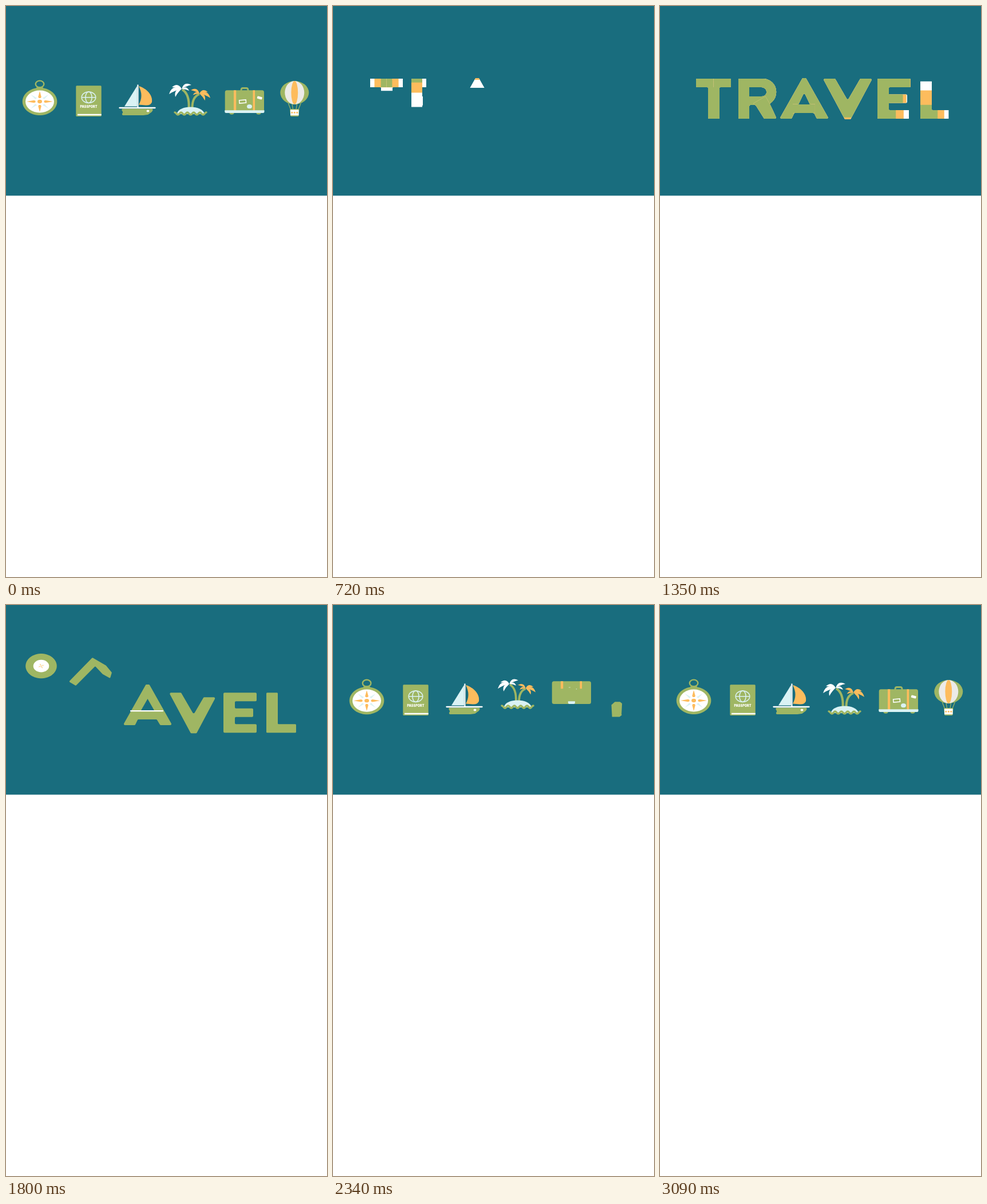
An HTML page with a canvas for the animation above (3.75 s loop, 561 by 998 pixels).

```html
<!DOCTYPE html>
<html lang="en">
<head>
<meta charset="utf-8">
<title>Travel</title>
<style>
html, body { margin: 0; width: 100%; height: 100%; overflow: hidden; background: #fff; }
canvas { display: block; width: 561px; height: 998px; }
</style>
</head>
<body>
<canvas id="stage" width="561" height="998"></canvas>
<script>
const c = document.getElementById('stage').getContext('2d');
const LOOP = 3750, STEP = 30, WRITTEN = 1560, DONE = 9999;
const TEAL = '#196d7e', GREEN = '#9fb663', ORANGE = '#fdbc5d', WHITE = '#fff',
      PALE = '#daf2f4', CREAM = '#ecebe8';

// ---- motion rules
const clamp = x => Math.max(0, Math.min(1, x));
const smooth = x => x * x * (3 - 2 * x);
const mix = (a, b, p) => a + (b - a) * p;
const ramp = (t, a, b) => smooth(clamp((t - a) / (b - a)));
const inOut = x => x < .5 ? 2 * x * x : 1 - 2 * (1 - x) * (1 - x);
const fall = t => 45 * (1 - Math.cos(Math.PI * clamp((t - 1600) / 550)));

// height of an icon: up to a peak, down a little too far, then to rest
function hop(t, start, from, peak, dur = 450) {
  const top = start + dur * .46, land = start + dur, over = 4;
  if (t < top) return mix(from, -peak, ramp(t, start, top));
  if (t < land) return mix(-peak, over, ramp(t, top, land));
  return over * (1 - ramp(t, land, land + 150));
}

// ---- polygons, clockwise from the lower left
const move = (p, dx, dy) => p.map(([x, y]) => [x + dx, y + dy]);
const box = (x, y, w, h) => [[x, y + h], [x, y], [x + w, y], [x + w, y + h]];
function turn(p, cx, cy, a, s = 1) {
  const u = Math.cos(a) * s, v = Math.sin(a) * s;
  return p.map(([x, y]) => [cx + (x - cx) * u - (y - cy) * v, cy + (x - cx) * v + (y - cy) * u]);
}
function arc(cx, cy, rx, ry, from, to, n = 12) {
  return Array.from({ length: n + 1 }, (_, i) => {
    const a = mix(from, to, i / n) * Math.PI / 180;
    return [cx + rx * Math.cos(a), cy + ry * Math.sin(a)];
  });
}
function resample(p, n = 160) {
  const next = i => p[(i + 1) % p.length];
  const len = p.map((a, i) => Math.hypot(next(i)[0] - a[0], next(i)[1] - a[1]));
  const total = len.reduce((a, b) => a + b), out = [];
  for (let k = 0, i = 0, sum = 0; k < n; k++) {
    const d = total * k / n;
    while (sum + len[i] < d) sum += len[i++];
    const f = len[i] ? (d - sum) / len[i] : 0;
    out.push(p[i].map((v, j) => mix(v, next(i)[j], f)));
  }
  return out;
}
function trace(p, r = 0) {
  const z = p[p.length - 1];
  c.moveTo((z[0] + p[0][0]) / 2, (z[1] + p[0][1]) / 2);
  p.forEach((a, i) => {
    const b = p[(i + 1) % p.length];
    c.arcTo(a[0], a[1], (a[0] + b[0]) / 2, (a[1] + b[1]) / 2, r);
  });
  c.closePath();
}
function morph(a, b, p, r = 2, hole) {
  let q = p < .5 ? a : b;
  if (p > 0 && p < 1) {
    const to = resample(b);
    q = resample(a).map((v, i) => v.map((n, j) => mix(n, to[i][j], p)));
    r = 0;
  }
  c.beginPath();
  trace(q, r);
  if (hole) trace(hole);
  c.fillStyle = GREEN;
  c.fill('evenodd');
}

// ---- drawing helpers
function oval(x, y, rx, ry, color, w) {
  c.beginPath();
  c.ellipse(x, y, rx, ry, 0, 0, 7);
  c.fillStyle = c.strokeStyle = color;
  c.lineWidth = w || 1;
  if (w) c.stroke(); else c.fill();
}
function shape(d, color) { c.fillStyle = color; c.fill(new Path2D(d)); }
function line(d, color, w, cap = 'butt') {
  c.strokeStyle = color;
  c.lineWidth = w;
  c.lineCap = cap;
  c.stroke(new Path2D(d));
}
function rect(x, y, w, h, color, r = 0) {
  c.beginPath();
  c.roundRect(x, y, w, h, r);
  c.fillStyle = color;
  c.fill();
}
function at(dx, dy, draw, px = 0, py = 0, s = 1, a = 0) {
  if (!s) return;
  c.save();
  c.translate(px + dx, py + dy);
  c.rotate(a);
  c.scale(s, s);
  c.translate(-px, -py);
  draw();
  c.restore();
}

// ---- letters, built from a common height, stem and bar
const TOP = 127, BASE = 197, STEM = 20, BAR = 15, TALL = BASE - TOP;
const letterT = (x, w) => [
  [x, TOP + BAR], [x, TOP], [x + w, TOP], [x + w, TOP + BAR],
  ...box(x + (w - STEM) / 2, TOP + BAR, STEM, TALL - BAR).reverse().filter((_, i) => i !== 1 && i !== 2).reverse()
];
const letterL = (x, w) => [[x, BASE], [x, TOP], [x + STEM, TOP], [x + STEM, BASE - BAR], [x + w, BASE - BAR], [x + w, BASE]];
function letterE(x, w, stem = STEM) {
  const p = [[x, BASE], [x, TOP]], gap = (TALL - BAR) / 2;
  for (let i = 0; i < 3; i++) {
    const y = TOP + gap * i, r = x + w - (i === 1 ? 6 : 0);
    if (i) p.push([x + stem, y]);
    p.push([r, y], [r, y + BAR]);
    if (i < 2) p.push([x + stem, y + BAR]);
  }
  return p;
}
// two slanted legs; flip turns them into a V
const legs = (cx, half, tip, flip) => {
  const y = h => flip ? TOP + h : BASE - h;
  return [[cx - half, y(0)], [cx - tip, y(71)], [cx + tip, y(71)], [cx + half, y(0)],
          [cx + half - 21, y(0)], [cx, y(flip ? 38 : 46)], [cx - half + 21, y(0)]];
};

const T = [[63, TOP + BAR], [63, TOP], [124, TOP], [124, TOP + BAR], [104, TOP + BAR], [104, BASE], [84, BASE], [84, TOP + BAR]];
const R = [...box(137, TOP, 0, TALL).slice(0, 2), ...arc(180, 150.5, 24, 23.5, -90, 60),
           [204, BASE], [182, BASE], [167, 173], [156, 173], [156, BASE]];
const R_HOLE = [[156, 158], [156, 142], ...arc(177, 150, 8, 8, -90, 90)];
const A_LEGS = legs(252, 43, 3);
const A = [...A_LEGS.slice(0, 5), [268, 187], [235, 187], A_LEGS[6]];
const A_HOLE = [[240, 172], [252, 151], [264, 172]];
const V = legs(328, 43, 5, true);
const E = letterE(380, 58), L = letterL(455, 52);

// stroke: x, y, dx, dy, width, delay
const stroke = (x, y, dx, dy, w, delay, dur = 330, own) =>
  ({ d: `M${x} ${y}l${dx} ${dy}`, len: Math.hypot(dx, dy), w, delay, dur, own });
const stem = (x, delay, dur) => stroke(x + STEM / 2, TOP, 0, TALL, STEM, delay, dur);
const bar = (x, y, w, delay) => stroke(x, y + BAR / 2, w, 0, BAR + 1, delay);
const LETTERS = [
  { p: T, strokes: [bar(93.5, TOP, 31, 0), bar(93.5, TOP, -31, 0), stroke(94, TOP + BAR, 0, 55, STEM, 186)] },
  { p: R, hole: R_HOLE, strokes: [stem(137, 0),
    { d: 'M156 134.5H179a15.7 15.7 0 0 1 0 31.5H156', len: 96, w: 17, delay: 124, dur: 420 },
    stroke(174, 164, 21, 37, 24, 344, 300)] },
  { p: A, hole: A_HOLE, strokes: [stroke(252, TOP - 1, 0, 71, 90, 0, 330, A_LEGS), bar(232, 172, 39, 294)] },
  { p: V, strokes: [stroke(328, TOP, 0, 71, 90, 0, 500)] },
  { p: E, strokes: [stem(380, 0), ...[0, 1, 2].map(i =>
    bar(400, TOP + 27.5 * i, i === 1 ? 32 : 38, 40 + 85 * i))] },
  { p: L, strokes: [stroke(465, BASE, 0, -TALL, STEM, 0, 360), bar(475, BASE - BAR, 32, 30)] }
];
function writeLetter({ p, hole, strokes }, t) {
  for (const s of strokes) {
    c.save();
    c.beginPath();
    trace(s.own || p, 2);
    if (hole && !s.own) trace(hole);
    c.clip('evenodd');
    [WHITE, ORANGE, GREEN].forEach((color, k) => {
      const f = inOut(clamp((t - s.delay) / s.dur - k * .2));
      if (!f) return;
      c.setLineDash([f < 1 ? f * s.len : 500, 500]);
      line(s.d, color, s.w);
    });
    c.restore();
  }
}

// ---- icons, each growing out of its letter
function compass(t) {
  const y = 167 + hop(t, WRITTEN, -28, 64, 650), x = 61.5 - 2.5 * ramp(t, 1800, 2130);
  const size = mix(.9, 1, ramp(t, 1800, 1960)), lift = ramp(t, WRITTEN, 1800);
  at(x, y + 22 * (1 - ramp(t, 1850, 2020)), () => {
    if (t < 1850) return;
    oval(0, -30.5, 7.3, 5.9, GREEN, 2.4);
    shape('M-5 -26H5L7 -21H-7Z', GREEN);
  });
  morph(move(T, -33 * lift, -56 * lift), arc(x, y, 30.3 * size, 24 * size, -195, 159, 59), ramp(t, 1590, 1770));
  const w = ramp(t, 1720, 1870);
  oval(x, y, 25 * w, 19.6 * w, WHITE);
  c.save();
  c.translate(x, y);
  const n = ramp(t, 1740, 1920);
  c.scale(n, n * .79);
  c.rotate(-2 * (1 - ramp(t, 1780, 2200)));
  for (let i = 0; i < 8; i++) {
    shape(i % 2 ? 'M9 -2L22 0L9 2Z' : 'M7.5 -1.5L10 -2.8L23 0L10 2.8L7.5 1.5Z', i % 2 ? PALE : ORANGE);
    c.rotate(Math.PI / 4);
  }
  oval(0, 0, 4, 4, ORANGE);
  c.restore();
}

const BENT = [[110, 134], [151, 92], [175, 106], [185, 118], [182, 128], [169, 121], [156, 107], [122, 141]];
function passport(t) {
  const dy = hop(t, 1580, 20, 56, 580), a = -.3 * (1 - ramp(t, 1750, 2230));
  const size = mix(1.05, 1, ramp(t, 2130, 2300)), cover = box(122.3, 139.3, 44.4, 53.7);
  const p = ramp(t, 1620, 1800);
  if (p < 1) morph(R, BENT, p, 2, turn(move(R_HOLE, 0, -25 * p), 165, 150, 0, 1 - p));
  else morph(BENT, move(turn(cover, 144.5, 166, a, size), 0, dy), ramp(t, 1800, 2020), 1.5);
  if (t < 2020) return;
  // details slide down into the cover
  const u = 12 * (1 - clamp((t - 2020) / 330)) ** 3;
  at(0, dy, () => {
    c.beginPath();
    trace(cover);
    c.clip();
    at(0, -20 * u, () => {
      oval(144.5, 159.8, 12.3, 9.7, PALE, 1.5);
      oval(144.5, 159.8, 5.6, 9.7, PALE, 1.5);
      line('M132.5 159.8h24', PALE, 1.5);
    });
    c.fillStyle = WHITE;
    c.font = '900 5.5px Inter, sans-serif';
    c.textAlign = 'center';
    c.fillText('PASSPORT', 144.5, 177.6 - 8 * u);
    rect(125, 188.8 - 5 * u, 42, 2.5, WHITE);
  }, 144.5, 166, size, a);
}

const HULL = [[201, 191], [204.5, 186], [201, 179.5], [258, 179.5], [255, 185], [248, 190], [240, 191]];
function boat(t) {
  const dx = 16.5 * (1 - ramp(t, 1800, 2200)), dy = hop(t, 1700, 45, 35);
  const ax = -4.5 * ramp(t, 1690, 1800), ay = Math.min(fall(t), 13), p = ramp(t, 1800, 1980);
  const sail = ramp(t, 1930, 2230);
  at(dx, dy, () => {
    shape('M229 140V175.5H207Z', PALE);
    shape('M232 140C246 144 257 156 255 168Q253 174 244 173.5L232 172.5Q241 157 232 140Z', ORANGE);
    rect(229.3, 137.5, 2.2, 41, WHITE);
  }, 230.5, 178, sail);
  morph(move(A, ax, ay), move(HULL, dx, dy), p, 2, p < 1 && turn(move(A_HOLE, ax, ay), 252 + ax, 168 + ay, 0, 1 - p));
  oval(248 + dx, 183.5 + dy, 2.4 * sail, 2 * sail, WHITE);
  const deck = 28 * ramp(t, 1740, 1800) + 3 * ramp(t, 1800, 1980);
  if (deck) line(`M${229.5 + dx - deck} ${178 + dy}h${2 * deck}`, WHITE, 2.3, 'round');
}

// crown of drooping leaves around the origin
function palm(color) {
  for (const [x, y] of [[-22, 9], [-17, -3], [17, -7], [-11, 14], [13, 3]]) {
    const side = Math.sign(x), ctrl = k => `${x / 2 + y * k * side} ${y / 2 - Math.abs(x) * k}`;
    shape(`M0 0Q${ctrl(.62)} ${x} ${y}Q${ctrl(.1)} 0 0Z`, color);
  }
}
function island(t) {
  const dx = 4 * (1 - ramp(t, 2130, 2350)), dy = hop(t, 2025, 60, 20);
  const cut = ramp(t, 1700, 1800), p = ramp(t, 1820, 2070);
  if (p < 1) {
    const v = V.map(([x, y]) => x > 340 ? [x - 4.5 * cut, y + 8 * cut] : [x, y]);
    return morph(move(v, 0, fall(Math.min(t, 1960))), move(box(294, 184.5, 57, 6), dx, dy), p);
  }
  at(dx, dy, () => {
    line('M308 146Q321 154 319.5 179', GREEN, 4);
    line('M338 154Q325 159 325.5 179', GREEN, 4);
    at(307, 145, () => palm(WHITE));
    c.translate(338, 153);
    c.scale(-.87, .87);
    palm(ORANGE);
  }, 321, 182, ramp(t, 2060, 2400));
  at(dx, dy, () => shape('M298.5 189C300 180 312 176.5 322 176.5C335 176.5 345 181 347.5 189Z', PALE),
    322, 188, ramp(t, 2030, 2130));
  at(dx, dy, () => {
    let d = '';
    for (let x = 0; x <= 55; x++) d += `${d ? 'L' : 'M'}${295 + x} ${188 - 2 * Math.cos(x * Math.PI / 5.5)}`;
    line(d, GREEN, 3.4, 'round');
  }, 322, 188, mix(1.12, 1, ramp(t, 2130, 2350)));
}

function suitcase(t) {
  const dy = hop(t, 2130, 39, 14), grow = ramp(t, 2300, 2450), body = box(382.7, 147.3, 68.3, 39.7);
  const p = ramp(t, 1920, 2130), y = mix(162 + Math.min(fall(t), 60), 206, p);
  const tilted = turn(move(letterE(380, 58, STEM + 10 * p), 5 * p, y - 162), 409 + 5 * p, y, -1.22 * p, mix(1, .95, p));
  if (grow) at(0, dy, () => {
    at(0, 8 * (1 - grow), () => line('M411 149V147Q411 143.5 414 143.5H420Q423 143.5 423 147V149', GREEN, 2.8));
    for (const x of [394.5, 441.5]) oval(x, 181 + 6 * grow, 4, 2.7, GREEN);
  });
  morph(tilted, move(body, 0, dy), ramp(t, 2130, 2310), p < 1 ? 2 : 3.5);
  if (t < 2270) return;
  const slide = 45 * (1 - ramp(t, 2350, 2730)), drop = 36 * ramp(t, 2270, 2440);
  at(0, dy, () => {
    c.save();
    c.beginPath();
    trace(body, 3.5);
    c.clip();
    rect(398, 147, 4.2, drop, ORANGE);
    rect(431.5, 147, 3.6, drop, ORANGE);
    at(0, -slide, () => rect(439, 158.3, 8.6, 4.4, WHITE, 1), 443.3, 160.5, 1, .26);
    at(0, -slide * .2, () => {
      c.strokeStyle = WHITE;
      c.lineWidth = 1.5;
      c.strokeRect(407.8, 164.4, 11.6, 5.2);
    }, 413.6, 167, grow, -.09);
    oval(425.5, 175.7 - slide * .33, 4.5 * grow, 3.6 * grow, PALE);
    c.restore();
    rect(416.9 - 34.6 * grow, 182.2, 69.2 * grow, 4.9, PALE, [0, 0, 2.5, 2.5]);
  });
}

function balloon(t) {
  const dy = hop(t, 2130, 84, 8), settle = ramp(t, 2610, 2800), dx = 1.5 * (settle - 1);
  const size = mix(1.1, 1, settle), k = ramp(t, 2500, 2720), g = ramp(t, 2620, 2990);
  const cx = 504.3 + dx, cy = 196.5 - 45 * k;
  if (k) {
    for (const side of [-1, -.4, .4, 1])
      line(`M${cx + 11 * side * Math.max(g, .1)} ${cy + 18.5 * k}L${cx + 6.5 * side} ${181.5 + dy}`, GREEN, 1.2);
    oval(cx, cy, 25 * g, 20.4 * g, GREEN);
    oval(cx, cy, 17 * k, 20.4 * k, CREAM);
    oval(cx, cy, 5.9 * k, 20.6 * Math.min(1, 1.12 * k), ORANGE);
  }
  const foot = 52 - 23 * ramp(t, 1800, 2130);
  const basket = [[497.3, 193], [496, 180], [512.6, 180], [511.3, 193]];
  morph(move(letterL(455, foot), 5 * ramp(t, 1850, 2130), fall(t) - 70 * ramp(t, 2150, 2420)),
    move(turn(basket, 504.3, 186, 0, size), dx, dy), ramp(t, 2150, 2420), 1.5);
  const w = ramp(t, 2400, 2540);
  if (w) at(dx, dy, () => {
    rect(497, 181.4, 14.6, 9.8 * w, WHITE);
    for (let i = -1; i <= 1; i++) oval(504.3 + 4.5 * i, 186.3, 1.5 * w, 1.5 * w, ORANGE);
  }, 504.3, 186, size);
}

const ICONS = [compass, passport, boat, island, suitcase, balloon];

function draw(t) {
  rect(0, 0, 561, 998, WHITE);
  rect(0, 0, 561, 331.5, TEAL);
  if (t >= WRITTEN) return ICONS.forEach(icon => icon(t));
  ICONS.forEach((icon, i) => {
    const f = clamp((t - 45 * i) / 290);
    at(0, 0, () => icon(DONE), 59 + 89 * i, 164, 1 - f * f);
  });
  LETTERS.forEach((l, i) => writeLetter(l, t - 456 - 45 * i - 15 * i * i));
}

const begin = performance.now();
function tick(now) {
  const t = Math.max(0, now - begin) % LOOP;
  draw(Math.floor(t / STEP) * STEP);
  requestAnimationFrame(tick);
}
draw(0);
requestAnimationFrame(tick);
</script>
</body>
</html>
```
